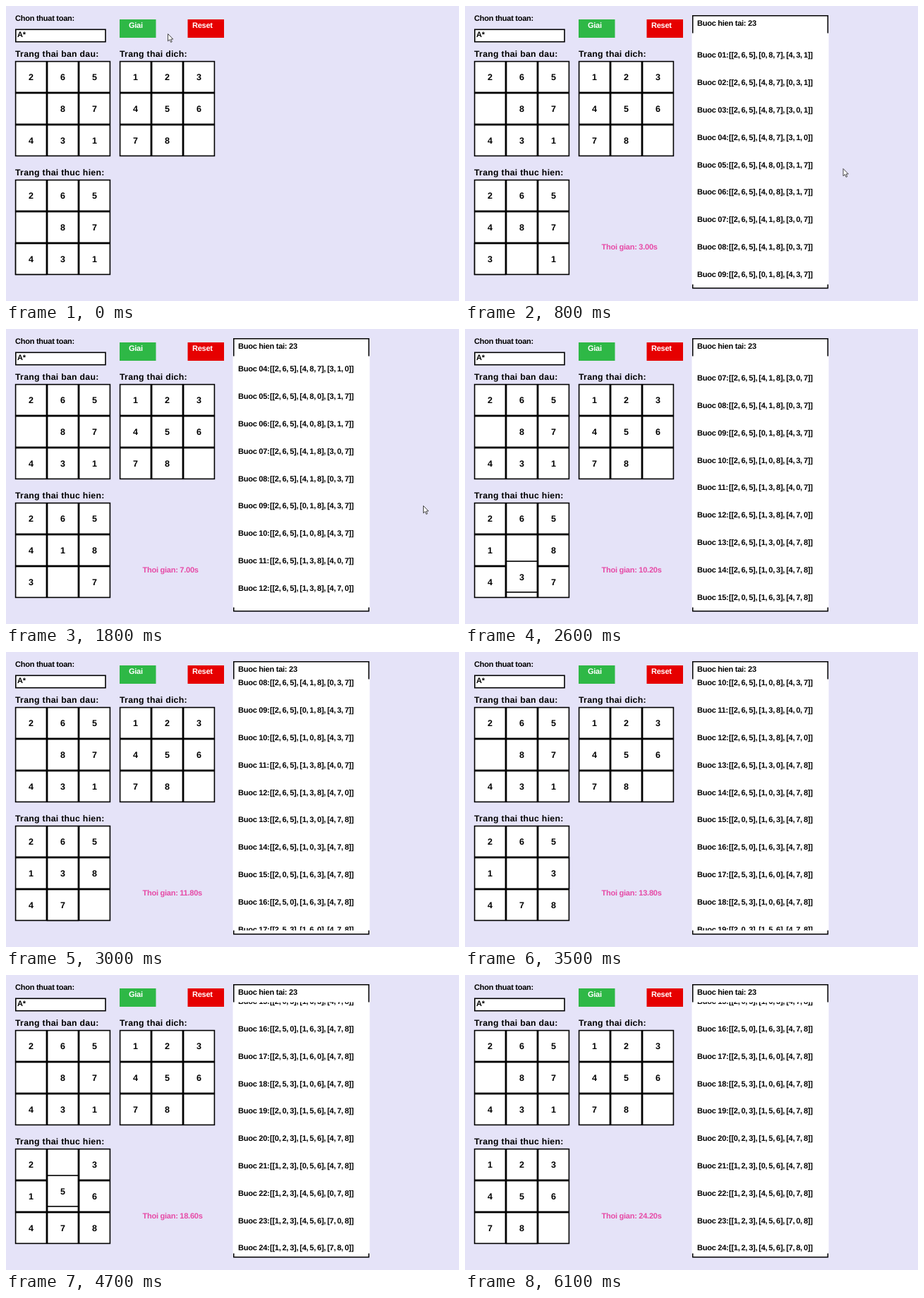
An HTML page for the animation above (6.2 s loop, 642 px wide and 418 px high).

```html
<!DOCTYPE html>
<html lang="vi">
<head>
<meta charset="utf-8">
<title>8-puzzle A*</title>
<style>
  html, body { margin: 0; width: 100%; height: 100%; overflow: hidden; background: #e5e3f8; }
  svg { display: block; width: 642px; height: 418px; }
  text { font: bold 11px "Liberation Sans", Arial, sans-serif; letter-spacing: -.25px; text-rendering: geometricPrecision; white-space: pre; }
  .title { font-size: 12.3px; letter-spacing: .27px; }
  .digit { font-size: 12.5px; letter-spacing: 0; text-anchor: middle; }
  .state { word-spacing: -.8px; }
  .cell { fill: #fff; stroke: #000; stroke-width: 1.6px; }
</style>
</head>
<body>
<svg id="stage" viewBox="0 0 642 418">
  <defs><clipPath id="view"><rect x="322" y="38.5" width="193" height="356"/></clipPath></defs>
</svg>
<script>
const LOOP = 6200, TICK = 100;
const CELL = 45, ROW = 38.8, NOTCH = ROW / 3;
const FIRST_MOVE = 1, MOVE_GAP = 1.01, MOVE_TIME = 0.51, MOVE_STEPS = 6;
const PANEL_AT = 300, CURSOR_GONE = 2000;

const startBoard = [2, 6, 5, 0, 8, 7, 4, 3, 1];
const goalBoard = [1, 2, 3, 4, 5, 6, 7, 8, 0];
const blanks = [...'367854763478541254103678'].map(Number);

// [ms, wheel notches] and [ms, x, y]
const scrollKeys = [[800, 0], [1400, 6], [1800, 10], [2600, 18], [3500, 29], [4600, 44.5]];
const cursorKeys = [[0, 229, 39], [100, 194, 34], [300, 196, 36], [500, 300, 110], [700, 480, 210], [900, 591, 250]];

const boards = [startBoard];
for (let i = 1; i < blanks.length; i++) {
  const b = [...boards[i - 1]];
  b[blanks[i - 1]] = b[blanks[i]];
  b[blanks[i]] = 0;
  boards.push(b);
}

const stage = document.getElementById('stage');

function add(parent, tag, attrs, content = '') {
  const el = document.createElementNS('http://www.w3.org/2000/svg', tag);
  for (const key in attrs) el.setAttribute(key, attrs[key]);
  el.textContent = content;
  parent.append(el);
  return el;
}
const rect = (parent, x, y, width, height, attrs) => add(parent, 'rect', { x, y, width, height, ...attrs });
const label = (parent, x, y, content, attrs) => add(parent, 'text', { x, y, ...attrs }, content);
const move = (el, x, y) => el.setAttribute('transform', `translate(${x} ${y})`);
const show = (el, on) => el.setAttribute('visibility', on ? 'visible' : 'hidden');
const cellPos = i => [i % 3 * CELL, Math.floor(i / 3) * CELL];

function tile(parent, x, y, n) {
  const g = add(parent, 'g');
  move(g, x, y);
  rect(g, 0.6, 0.6, CELL - 1.2, CELL - 1.2, { class: 'cell' });
  return { g, digit: label(g, CELL / 2, 27, n || '', { class: 'digit' }) };
}

function grid(x, y, board) {
  const g = add(stage, 'g');
  move(g, x, y);
  return { g, tiles: board.map((n, i) => tile(g, ...cellPos(i), n)) };
}

function button(x, fill, textX, content) {
  rect(stage, x, 19, 51.5, 26, { fill });
  label(stage, textX, 31, content, { fill: '#fff' });
}

// Controls
label(stage, 13, 21, 'Chon thuat toan:');
rect(stage, 13.8, 33.3, 127.2, 17.4, { fill: '#fff', stroke: '#000', 'stroke-width': 1.6 });
label(stage, 16, 44, 'A*');
button(161, '#2eb846', 174, 'Giai');
button(257.5, '#e60000', 264, 'Reset');

// Boards
label(stage, 13, 71.7, 'Trang thai ban dau:', { class: 'title' });
label(stage, 161, 71.7, 'Trang thai dich:', { class: 'title' });
label(stage, 13, 239.7, 'Trang thai thuc hien:', { class: 'title' });
grid(13, 78, startBoard);
grid(161, 78, goalBoard);
const live = grid(13, 246, startBoard);
const mover = tile(live.g, 0, 0, 0);
const timer = label(stage, 193.5, 344.8, '', { fill: '#e64aa6' });

// Step list
const panel = add(stage, 'g');
rect(panel, 322.75, 13.75, 191.5, 386, { fill: '#fff', stroke: '#000', 'stroke-width': 1.5 });
rect(panel, 321.5, 38.5, 194, 356, { fill: '#fff' });
label(panel, 329, 27.8, 'Buoc hien tai: 23');
const list = add(add(panel, 'g', { 'clip-path': 'url(#view)' }), 'g');
boards.forEach((b, i) => {
  const y = 73.3 + i * ROW;
  const rows = [0, 3, 6].map(r => `[${b.slice(r, r + 3).join(', ')}]`);
  label(list, 329, y, `Buoc ${String(i + 1).padStart(2, '0')}:`);
  label(list, 374, y, `[${rows.join(', ')}]`, { class: 'state' });
});

const cursor = add(stage, 'path', {
  d: 'M.5 .5V10.8L2.9 8.6L4.6 12.4L6.2 11.7L4.6 8H7.8Z',
  fill: '#fff', stroke: '#333', 'stroke-width': 0.9
});

function along(keys, t, col) {
  if (t <= keys[0][0]) return keys[0][col];
  for (let i = 1; i < keys.length; i++) {
    const a = keys[i - 1], b = keys[i];
    if (t <= b[0]) return a[col] + (b[col] - a[col]) * (t - a[0]) / (b[0] - a[0]);
  }
  return keys[keys.length - 1][col];
}

const clamp = (v, lo, hi) => Math.min(hi, Math.max(lo, v));

function drawBoard(seconds) {
  const since = seconds - FIRST_MOVE;
  const k = clamp(Math.floor(since / MOVE_GAP), 0, blanks.length - 2);
  const raw = clamp((since - k * MOVE_GAP) / MOVE_TIME, 0, 1);
  const p = Math.round(raw * MOVE_STEPS) / MOVE_STEPS;
  const to = blanks[k], from = blanks[k + 1];
  live.tiles.forEach((c, i) => {
    c.digit.textContent = i === from ? '' : boards[k][i] || '';
  });
  const [x0, y0] = cellPos(from), [x1, y1] = cellPos(to);
  mover.digit.textContent = boards[k][from];
  move(mover.g, x0 + (x1 - x0) * p, y0 + (y1 - y0) * p);
}

function draw(t) {
  const seconds = t * 0.004 - 0.2;
  drawBoard(seconds);

  const solved = t >= PANEL_AT;
  show(panel, solved);
  show(timer, solved);
  timer.textContent = `Thoi gian: ${seconds.toFixed(2)}s`;

  const notches = Math.min(Math.round(along(scrollKeys, t, 1)), 44.48);
  move(list, 0, -notches * NOTCH);

  show(cursor, t < CURSOR_GONE);
  move(cursor, along(cursorKeys, t, 1), along(cursorKeys, t, 2));
}

const begin = performance.now();
function frame() {
  const t = (performance.now() - begin) % LOOP;
  draw(Math.floor(t / TICK) * TICK);
  requestAnimationFrame(frame);
}
frame();
</script>
</body>
</html>
```
